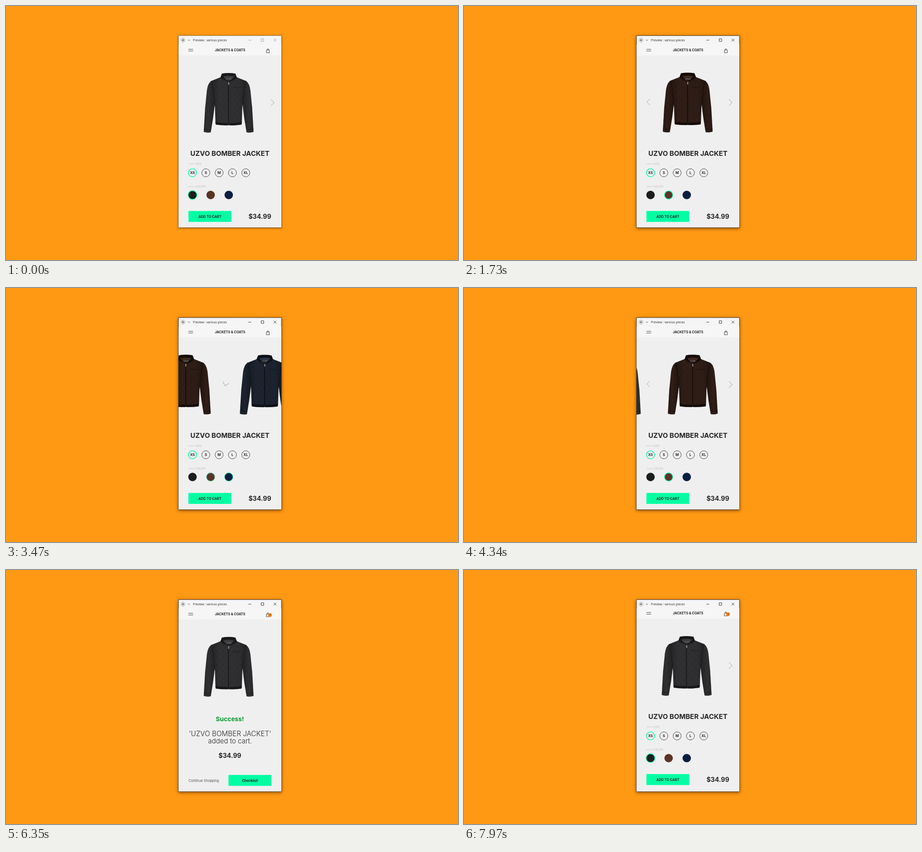
Write an HTML page that moves like this. It is 998 px wide and 561 px high and loops after 8000 ms.

```html
<!DOCTYPE html>
<html lang="en">
<head>
<meta charset="utf-8">
<title>Shop preview</title>
<style>
html, body { margin: 0; width: 100%; height: 100%; overflow: hidden; background: #ff9813; }
svg { display: block; width: 100%; height: 100%; }
text { font-family: Inter, "Open Sans", sans-serif; fill: #262628; }
.b { font-weight: 700; }
.l { font-weight: 300; }
.m { text-anchor: middle; }
.e { text-anchor: end; }
.tag { font-size: 6px; letter-spacing: .3px; fill: #bcbcbc; }
.line { fill: none; stroke: #2c2c2c; stroke-width: .9; }
.arrow { fill: none; stroke: #8a8a8a; stroke-width: .8; }
.ring { fill: none; stroke: #00f9a0; stroke-width: 1.5; }
#frame { fill: #f5f5f5; }
.idle { stroke: rgba(70,60,50,.5); filter: drop-shadow(0 1px 2px rgba(0,0,0,.5)); }
.active { stroke: rgba(50,45,40,.9); filter: drop-shadow(0 2px 3.5px rgba(0,0,0,.5)); }
</style>
</head>
<body>
<svg id="stage" viewBox="0 0 998 561" preserveAspectRatio="none"></svg>
<script>
const LOOP = 8000, PAGE = 404, MINT = '#00ffa3';
const NAME = 'UZVO BOMBER JACKET';

const text = (x, y, size, cls, str) =>
  `<text x="${x}" y="${y}" font-size="${size}" class="${cls}">${str}</text>`;
const rect = (x, y, w, h, fill) =>
  `<rect x="${x}" y="${y}" width="${w}" height="${h}" fill="${fill}"/>`;
const line = d => `<path class="line" d="${d}"/>`;
const arrow = id => `<path id="${id}" class="arrow" d="M-3.7-6.9L3.6 0L-3.7 6.9"/>`;

// Jacket centred on x = 0; y is in stage units
function jacket(base, dark, edge) {
  const arm = `<path d="M-39 166Q-46 171-48 186L-52 226L-55 278Q-47 281-39.5 279L-34.5 248L-30 212L-29 168Z"`;
  const sleeve = `${arm} fill="${base}"/>${arm} fill="url(#quilt)"/>${arm} fill="url(#armShade)"/>
    <path d="M-54.8 272Q-47 274.5-38.6 272.5" fill="none" stroke="${dark}" stroke-width=".8"/>`;
  const torso = `<path d="M-17 157L-39.5 166Q-33 188-30.5 215L-29 260Q0 265 29 260L30.5 215Q33 188 39.5 166L17 157Q0 173-17 157Z"`;
  return `<g>${sleeve}</g><g transform="scale(-1 1)">${sleeve}</g>
    ${torso} fill="${base}"/>${torso} fill="url(#quilt)"/>${torso} fill="url(#bodyShade)"/>
    <path d="M-38 168Q-32 190-30 222M38 168Q32 190 30 222" fill="none" stroke="${dark}" stroke-width=".9"/>
    <path d="M-29 256Q0 261 29 256L28.5 262Q15 264 1 263.6L0 262.6L-1 263.6Q-15 264-28.5 262Z" fill="${dark}"/>
    <path d="M-15 149.2Q0 146.6 15 149.2L18.5 158.5Q11 165 0 168Q-11 165-18.5 158.5Z" fill="${dark}"/>
    <path d="M-12 155.5Q0 152.5 12 155.5Q8 163 0 165.5Q-8 163-12 155.5Z" fill="${edge}"/>
    ${rect(-7, 159.2, 14, 4.4, dark)}
    <text x="0" y="163.2" font-size="4.4" class="b m" style="fill:#999">${NAME.slice(0, 4)}</text>
    <path d="M-18.5 158.5Q-9 165-.6 167.5" fill="none" stroke="${edge}" stroke-width=".6"/>
    <path d="M0 167V262" stroke="${dark}" stroke-width="2.6"/>
    <path d="M.9 168V262" stroke="${edge}" stroke-width=".6"/>
    ${rect(-.8, 168, 1.7, 6, '#aaa')}
    <path d="M10 179Q17 182 25 180" fill="none" stroke="${dark}" stroke-width=".7"/>`;
}
const BLACK = ['#303032', '#18181a', '#3c3c3f'];
const BROWN = ['#2f1d16', '#140b08', '#40291f'];
const BLUE = ['#1c232f', '#0c1017', '#2c3644'];

const badge = id => `<g id="${id}"><circle cx="583" cy="99.6" r="4.1" fill="#ff7d0a"/>
  ${text(583, 101.5, 5.2, 'm', '1')}</g>`;

const header = id => rect(381, 85, 227, 24.3, '#f6f6f6') +
  line('M402.8 95.6H413.2M402.8 99.4H413.2') +
  text(494.7, 100.1, 7.3, 'b m', 'JACKETS &amp; COATS') +
  line('M575.2 97.2H581.2L581.6 103.2H574.8ZM576.6 97V96Q576.7 94.6 578.2 94.6Q579.7 94.6 579.8 96V97') +
  badge(id);

const button = (x, label) => rect(x, 452.7, 94.4, 24.1, MINT) +
  text(x + 47.2, 467.7, 7.4, 'b m', label);

const sizes = ['XS', 'S', 'M', 'L', 'XL'].map((s, i) => {
  const x = 411.8 + i * 29.4;
  return `<circle cx="${x}" cy="368.4" r="8.9" class="${i ? 'line' : 'ring'}"/>` +
    text(x, 371.2, 7.8, 'b m', s);
}).join('');

const swatches = ['#1d1d1d', '#5b3426', '#0b1f42'].map((c, i) => {
  const x = 411.8 + i * 40;
  return `<circle cx="${x}" cy="417.4" r="9.3" fill="${c}"/>
    <circle id="ring${i}" class="ring" cx="${x}" cy="417.4" r="${i ? 8.9 : 9.6}"/>`;
}).join('');

const label = (y, str) => `<path d="M402.8 ${y - 2.3}H415.8" stroke="#bcbcbc" stroke-width=".8"/>
  <text x="418" y="${y}" class="tag">${str}</text>`;

const product = `<g id="product">${rect(381, 85, 227, PAGE, '#efefef')}
  ${arrow('prev')}${arrow('next')}
  <g id="coat0">${jacket(...BLACK)}</g>
  <g id="coat1">${jacket(...BROWN)}</g>
  <g id="coat2">${jacket(...BLUE)}</g>
  ${header('count')}
  ${text(494.4, 331.1, 15, 'b m', NAME)}
  ${label(350.8, 'SIZE')}${sizes}
  ${label(401.2, 'COLOR')}${swatches}
  ${button(402.8, 'ADD TO CART')}
  ${text(585.6, 470.2, 14.1, 'b e', '$34.99')}</g>`;

const success = `<g id="success">${rect(381, 85, 227, PAGE, '#efefef')}
  <g transform="translate(491.6 0)">${jacket(...BLACK)}</g>
  ${header('added')}
  <text x="494.4" y="334.4" font-size="13.8" class="b m" style="fill:#0a9a2e">Success!</text>
  ${text(494.8, 367, 15.3, 'l m', `'${NAME}'`)}
  ${text(494.6, 383.2, 15, 'l m', 'added to cart.')}
  ${text(494.4, 415.2, 14.1, 'b m', '$34.99')}
  ${text(403, 467.7, 7.5, 'l', 'Continue Shopping')}
  ${button(491.3, 'Checkout')}</g>`;

const bar = `<circle cx="390.8" cy="75.4" r="4.2" fill="none" stroke="#777" stroke-width=".8"/>
  <circle cx="390.8" cy="75.4" r="1.8" fill="#555"/>
  ${line('M401.8 74.4L403.9 76.5L406 74.4')}
  <text x="412.8" y="78" font-size="6.8" style="font-family:'Open Sans','Noto Sans',sans-serif">Preview : various pieces</text>
  <path id="controls" fill="none" stroke-width=".9" d="M535.3 75.4H541.3M563.4 72.5H569V78.1H563.4ZM591 72.4L596.8 78.2M596.8 72.4L591 78.2"/>`;

const stage = document.getElementById('stage');
stage.innerHTML = `<defs>
  <clipPath id="view"><rect x="381" y="85" width="227" height="${PAGE}"/></clipPath>
  <pattern id="quilt" width="13" height="15" patternUnits="userSpaceOnUse">
    <path d="M0 0L13 15M13 0L0 15" stroke="#000" stroke-opacity=".35" stroke-width=".8"/>
    <path d="M0 1L13 16M13 1L0 16" stroke="#fff" stroke-opacity=".08" stroke-width=".6"/>
  </pattern>
  <linearGradient id="bodyShade">
    <stop offset="0" stop-opacity=".3"/><stop offset=".25" stop-opacity="0"/>
    <stop offset=".8" stop-opacity=".04"/><stop offset="1" stop-opacity=".3"/>
  </linearGradient>
  <linearGradient id="armShade">
    <stop offset="0" stop-opacity=".15"/><stop offset=".4" stop-opacity="0"/>
    <stop offset="1" stop-opacity=".35"/>
  </linearGradient></defs>
  <rect width="998" height="561" fill="#ff9813"/>
  <rect id="frame" x="380.8" y="65.4" width="227.4" height="423.8"/>
  ${bar}
  <g clip-path="url(#view)">${product}${success}</g>`;

const $ = id => document.getElementById(id);
const set = (id, key, val) => $(id).setAttribute(key, val);
const move = (id, x, y, turn = 0) => set(id, 'transform', `translate(${x} ${y}) rotate(${turn})`);
const clamp = v => Math.max(0, Math.min(1, v));
const part = (t, start) => clamp((t - start) / 540);
const inOut = p => p < .5 ? 4 * p ** 3 : 1 - 4 * (1 - p) ** 3;
const out = p => 1 - (1 - p) ** 3;

function draw(t) {
  const slide = start => inOut(part(t, start));
  // 0 black, 1 brown, 2 blue
  const pos = slide(635) + slide(1715) - slide(3215) - slide(4205);
  const first = clamp(pos), second = clamp(pos - 1);

  move('coat0', 491.6 - 167 * first, 0);
  move('coat1', 494 + 175 * (1 - first) - 169 * second, -.6);
  move('coat2', 496 + 177 * (1 - second), -.3);
  [1 - first, first - second, second].forEach((v, i) => set('ring' + i, 'opacity', v));

  move('prev', 407.2, 212, 180);
  set('prev', 'opacity', first - second);
  move('next', 588.6 - 181.4 * second, 213.2 - 1.2 * second, 180 * second);

  const added = out(part(t, 5839)), back = out(part(t, 7522));
  const returning = t >= 7522;
  move('product', 0, returning ? PAGE * (back - 1) : PAGE * added);
  move('success', 0, returning ? PAGE * back : PAGE * (added - 1));
  set('count', 'opacity', returning ? 1 : 0);

  const active = t >= 500;
  set('frame', 'class', active ? 'active' : 'idle');
  set('controls', 'stroke', active ? '#222' : '#999');
}

const begin = performance.now();
function tick() {
  draw((performance.now() - begin) % LOOP);
  requestAnimationFrame(tick);
}
draw(0);
requestAnimationFrame(tick);
</script>
</body>
</html>
```
